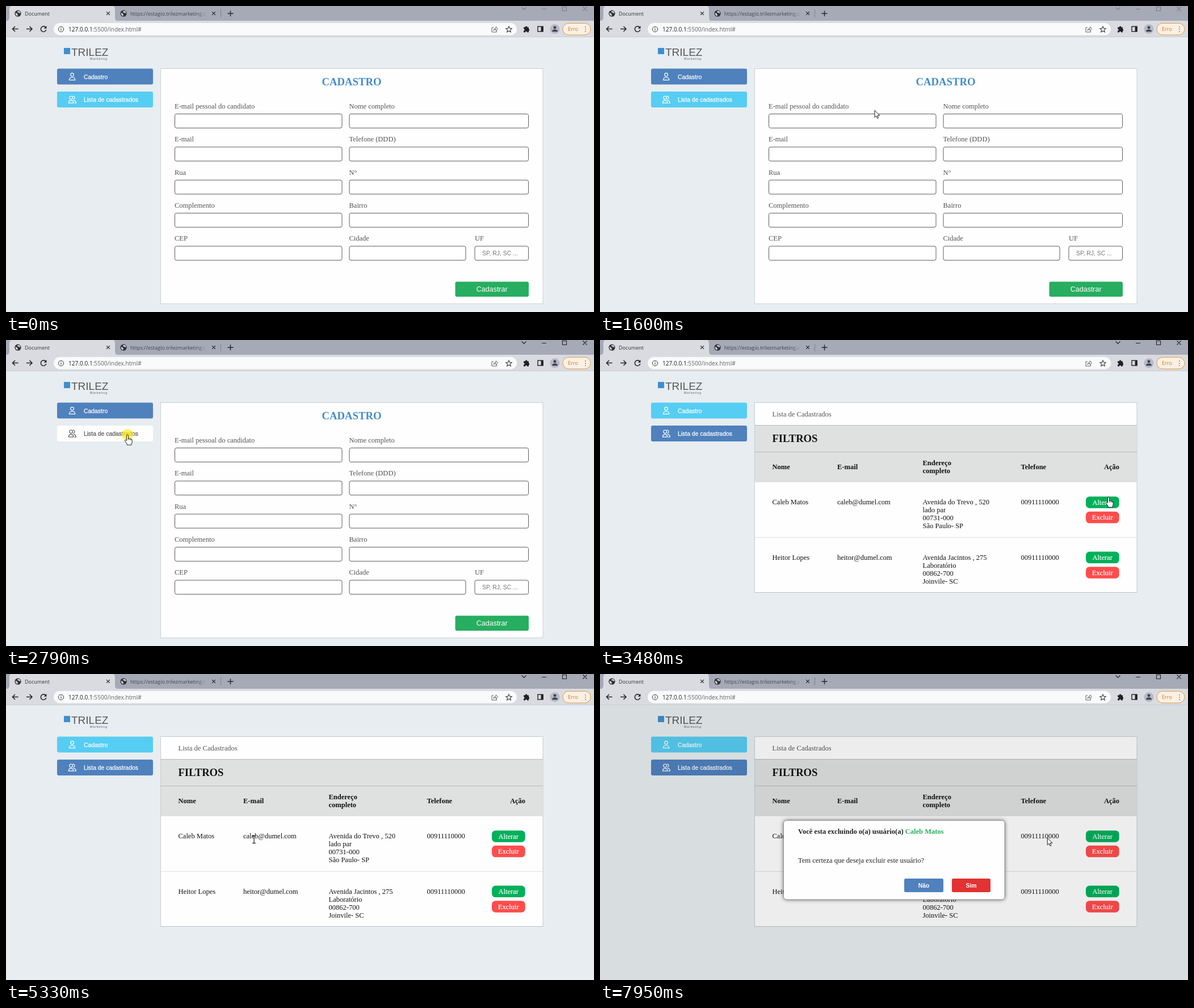
An HTML page that plays this animation: 1036x540 px, repeating every 8 s.

```html
<!DOCTYPE html>
<html lang="pt-BR">
<head>
<meta charset="utf-8">
<title>Cadastro</title>
<style>
html, body { margin: 0; width: 100%; height: 100%; overflow: hidden; background: #e7edf0; }
svg { display: block; width: 100%; height: 100%; }
text { white-space: pre; }
.serif { font: 12.5px "Liberation Serif", "Times New Roman", serif; }
.sans { font: 10.4px "Liberation Sans", Arial, sans-serif; }
.ui { font: 9px "Open Sans", "Noto Sans", sans-serif; }
.b { font-weight: bold; }
.side { stroke-width: .25; }
</style>
</head>
<body>
<svg id="stage" viewBox="0 0 1036 540"></svg>
<script>
const LOOP = 8000;
const BLUE = '#4f81bd', CYAN = '#56cdf2', GREEN = '#00b05a', RED = '#ff4c4c';
const PERSON = { name: 'Caleb Matos', mail: 'caleb@dumel.com', phone: '00911110000',
  address: ['Avenida do Trevo , 520', 'lado par', '00731-000', 'São Paulo- SP'] };
const OTHER = { name: 'Heitor Lopes', mail: 'heitor@dumel.com', phone: '00911110000',
  address: ['Avenida Jacintos , 275', 'Laboratório', '00862-700', 'Joinvile- SC'] };

const rect = (x, y, w, h, fill, more = '') =>
  `<rect x="${x}" y="${y}" width="${w}" height="${h}" fill="${fill}" ${more}/>`;
const text = (x, y, s, fill, cls = 'serif', more = '') =>
  `<text x="${x}" y="${y}" fill="${fill}" class="${cls}" ${more}>${s}</text>`;
const line = (d, color, w = 1, more = '') =>
  `<path d="${d}" fill="none" stroke="${color}" stroke-width="${w}" ${more}/>`;
const dot = (x, y, r, fill, more = '') => `<circle cx="${x}" cy="${y}" r="${r}" fill="${fill}" ${more}/>`;
const group = (id, body, more = '') => `<g id="${id}" ${more}>${body}</g>`;
const mid = 'text-anchor="middle"';

// Browser frame
const cross = (x, y, r, color, w) =>
  line(`M${x - r} ${y - r}L${x + r} ${y + r}M${x + r} ${y - r}L${x - r} ${y + r}`, color, w);
const globe = x => dot(x, 13.2, 5.6, '#2f3136') +
  `<path d="M${x - 4.4} 12.3q2.4-.1 3 1.2t1.4 1.6l-.9 2.7q-3-.9-3.5-5.5zM${x - .8} 9.2l3.2-.3q2 1.4 2.1 3.4l-2.2.5-1-1.4-2.4-.5z" fill="#d6d8de"/>`;

function browser() {
  const ink = '#3c4043';
  return rect(0, 0, 1036, 27, '#a6a9b6') +
    '<path d="M0 27Q6 26 6 20V6Q6-1 13-1H185Q192-1 192 6V20Q192 26 198 27Z" fill="#d9dbe0"/>' +
    rect(0, 26, 1036, 29, '#d9dbe0') + rect(0, 54, 1036, 1, '#c9ccd1') +
    globe(21) + text(33, 16.5, 'Document', '#303237', 'ui') + cross(180, 13, 2.9, '#25272b', 1.2) +
    globe(207) + text(219, 16.5, 'https://estagio.trilezmarketing.c', 'url(#fade)', 'ui') +
    cross(366, 13, 2.9, '#25272b', 1.2) + line('M378.5 6V20', '#7f828d') +
    line('M390.5 13.2H400.5M395.5 8.2V18.2', '#25272b', 1.4) +
    group('controls', line('M908.5 2.5L912.5 6.5L916.5 2.5M944 5.5H952M980.5 1.5H987.5V8.5H980.5ZM1016.5 1.5L1023.5 8.5M1023.5 1.5L1016.5 8.5', 'currentColor', 1.1)) +
    rect(84, 30, 816, 21.5, '#f9fafb', 'rx="10.7"') +
    line('M21.5 40.5H11.5M16 36L11.5 40.5L16 45M36 40.5H46M41.5 36L46 40.5L41.5 45', '#25272b', 1.6) +
    line('M70.3 38.2A4.8 4.8 0 1 0 70.8 42', '#25272b', 1.6) + '<path d="M71.5 35V39.8H66.7Z" fill="#25272b"/>' +
    dot(97, 41, 4.7, 'none', `stroke="${ink}"`) + line('M97 40.3V43.6M97 38V39.2', ink, 1.1) +
    `<text x="110" y="44.5" class="ui" style="font-size:10.1px" fill="#202124">127.0.0.1<tspan fill="#5f6368">:5500/index.html#</tspan></text>` +
    line('M859 38H856V46H864.5V43.5M858.8 43.2Q859.5 39.5 863.2 39.3V36.8L866.8 40.3L863.2 43.6V41.3Q860.5 41.4 858.8 43.2Z', '#5f6368', 1) +
    line('M886 35.9L887.5 39.4L891.3 39.8L888.4 42.2L889.3 46L886 44L882.7 46L883.6 42.2L880.7 39.8L884.5 39.4Z', ink, 1.1) +
    '<path d="M912 37.5H914.7A1.9 1.9 0 0 1 918.5 37.5H921V40.4A1.9 1.9 0 0 1 921 44V46.5H918.2A1.7 1.7 0 0 0 914.8 46.5H912V43.7A1.7 1.7 0 0 0 912 40.3Z" fill="#202124"/>' +
    rect(937, 36.2, 9, 8.8, 'none', 'stroke="#202124" stroke-width="1.4"') + rect(942.6, 36, 4, 9, '#202124') +
    dot(967, 40.8, 8.5, '#b4b8c8') + dot(967, 38, 2.4, ink) + '<path d="M962 45.2Q962 41.6 967 41.6T972 45.2Z" fill="#3c4043"/>' +
    rect(981, 30.5, 49, 20.5, '#faf0e4', 'rx="10.2" stroke="#e59a45"') +
    text(990, 44.2, 'Erro', '#d9760b', 'ui', 'style="font-size:9.2px"') +
    [37, 41, 45].map(y => dot(1021, y, 1, '#d9760b')).join('');
}

// Page parts
const head = (x, y) => `<circle cx="${x}" cy="${y}" r="2.8"/>`;
const icons = [
  head(116.6, 121.2) + '<path d="M111.5 130.6Q111.5 126 116.6 126T121.7 130.6Z"/>',
  head(114.6, 161.8) + '<path d="M110.4 171.1Q110.4 166.6 114.6 166.6T118.8 171.1ZM117.6 159.2A2.7 2.7 0 1 1 118.2 164.5M119 166.4Q123.3 167 123.3 171.1H120.4"/>'
];
const sideButton = (i, y, label) => group('side' + i,
  rect(90, y, 169, 28, BLUE, 'rx="3"') +
  `<g fill="none" stroke="currentColor" stroke-width="1.2">${icons[i]}</g>` +
  text(137, y + 18, label, 'currentColor', 'sans side', 'stroke="currentColor"'));

const row = k => 58.35 * k;
const input = (x, k, w) => rect(x + .5, 190.5 + row(k), w, 24.8, '#fff', 'rx="3" stroke="#5c5c5c"');

function form() {
  const labels = [['E-mail pessoal do candidato', 'Nome completo'], ['E-mail', 'Telefone (DDD)'],
    ['Rua', 'N°'], ['Complemento', 'Bairro'], ['CEP', 'Cidade']];
  return rect(272.5, 110.5, 673.5, 415, '#fefefe', 'stroke="#cbd0d3"') +
    text(609, 140, 'CADASTRO', '#428bca', 'serif b', mid + ' style="font-size:18.7px"') +
    labels.map(([a, b], k) =>
      text(297, 181 + row(k), a, '#545454') + text(604.5, 181 + row(k), b, '#545454') +
      input(297, k, 294.5) + input(604.5, k, k < 4 ? 315.5 : 205)).join('') +
    text(826, 181 + row(4), 'UF', '#545454') + input(825.5, 4, 94.5) +
    text(839, 439.8, 'SP, RJ, SC ...', '#757575', 'sans') +
    rect(791.5, 486.5, 129.5, 26.5, '#27ae60', 'rx="3"') +
    text(856.2, 503.6, 'Cadastrar', '#fff', 'sans', mid + ' style="font-size:12.5px"');
}

const action = (id, y, label, fill) => group(id, rect(856, y, 58.7, 20.5, fill, 'rx="6.5"') +
  text(885.2, y + 14.3, label, '#fff', 'serif', mid + ' stroke="#fff" stroke-width=".2"'));
const record = (p, y, i) =>
  text(303.5, y, p.name, '#111') + text(418, y, p.mail, '#111') +
  p.address.map((s, k) => text(568.5, y + 14 * k, s, '#111')).join('') +
  text(741.5, y, p.phone, '#111') +
  action('edit' + i, y - 14.2, 'Alterar', GREEN) + action('drop' + i, y + 12.4, 'Excluir', RED);

function list() {
  const th = (x, y, s) => text(x, y, s, '#111', 'serif b');
  return rect(272.5, 110.5, 673.5, 335, '#fefefe', 'stroke="#c9cdcf"') +
    text(303.5, 135, 'Lista de Cadastrados', '#555') +
    rect(273, 150.5, 673, 100.5, '#dfe0e0') +
    line('M272 150.5H946M272 197.5H946', '#b9bbbb') +
    text(303.5, 180, 'FILTROS', '#111', 'serif b', 'style="font-size:18.6px"') +
    th(303.5, 228.3, 'Nome') + th(418, 228.3, 'E-mail') + th(568.5, 221.3, 'Endereço') +
    th(568.5, 235.3, 'completo') + th(741.5, 228.3, 'Telefone') + th(888, 228.3, 'Ação') +
    record(PERSON, 290.4, 0) + line('M273 348.5H946', '#dcdede') + record(OTHER, 387.8, 1) +
    line('M272 445.5H946', '#bfc3c5');
}

function dialog() {
  const button = (x, w, label, fill) => rect(x, 361, w, 24, fill, 'rx="2.5"') +
    text(x + w / 2, 376.8, label, '#fff', 'sans b', mid);
  return rect(0, 55, 1036, 485, '#000', 'opacity=".065"') +
    rect(323.5, 258.5, 389.5, 139.5, '#555', 'rx="5" filter="url(#blur)"') +
    rect(323.5, 258.5, 389.5, 139.5, '#fefefe', 'rx="5" stroke="#8a8a8a" stroke-width=".8"') +
    `<text x="349" y="282" class="serif b" fill="#222">Você esta excluindo o(a) usuário(a) <tspan fill="#27ae60">${PERSON.name}</tspan></text>` +
    text(349, 333, 'Tem certeza que deseja excluir este usuário?', '#222') +
    button(536, 69, 'Não', BLUE) + button(620, 68, 'Sim', '#e23232');
}

const outline = 'fill="#fff" stroke="#111" stroke-width=".95" stroke-linejoin="round"';
const pointer = group('click', dot(0, 0, 9.8, '#ffee10', 'opacity=".72"')) +
  group('arrow', `<path d="M.3.4V12.7L3.1 10L5 14.4L7 13.5L5.1 9.3H9Z" ${outline}/>`) +
  group('hand', `<path d="M-1.5 10.5V1.7A1.45 1.45 0 0 1 1.4 1.7V6.6Q3.9 5.9 4.1 7.2Q6.2 6.7 6.4 8.2Q8.2 8 8.2 9.8V13Q8 15 7 16.6V18.2H-.6V16.8Q-2 14.5 -4.3 11.6Q-5 9.5 -3.6 9.2Q-2.6 9.3 -1.5 10.8Z" ${outline}/>` +
    line('M1.4 6.6V9.6M4.1 7.2V9.8M6.4 8.2V10', '#111', .85)) +
  group('beam', line('M-3-6.5H-.8L0-5.8L.8-6.5H3M0-5.8V5.8M-3 6.5H-.8L0 5.8L.8 6.5H3', '#111', 1.1));

const stage = document.getElementById('stage');
stage.innerHTML =
  `<defs><filter id="blur" x="-10%" y="-20%" width="120%" height="140%"><feGaussianBlur stdDeviation="3.5"/></filter>
  <linearGradient id="fade" gradientUnits="userSpaceOnUse" x1="335" x2="356" y1="0" y2="0">
  <stop stop-color="#43464e"/><stop offset="1" stop-color="#43464e" stop-opacity="0"/></linearGradient></defs>` +
  rect(0, 0, 1036, 540, '#e7edf0') + browser() +
  rect(102, 74, 11, 11, '#3f8fd0') +
  text(115, 88, 'TRILEZ', '#58595b', 'sans', 'style="font-size:19px"') +
  text(148, 94.5, 'Marketing', '#58595b', 'sans', 'style="font-size:5.2px" letter-spacing=".9"') +
  sideButton(0, 110.5, 'Cadastro') + sideButton(1, 151, 'Lista de cadastrados') +
  group('form', form()) + group('list', list()) + group('dialog', dialog()) + group('pointer', pointer);

const el = id => document.getElementById(id);
const show = (id, on) => { el(id).style.display = on ? '' : 'none'; };
const boxes = selector => [...stage.querySelectorAll(selector)].map(n => n.getBBox());
const inside = (b, [x, y]) => x >= b.x && x <= b.x + b.width && y >= b.y && y <= b.y + b.height;

// Hit areas, measured while everything is shown
const sideIds = ['side0', 'side1'], actionIds = ['edit0', 'drop0', 'edit1', 'drop1'];
const area = Object.fromEntries([...sideIds, ...actionIds].map(id => [id, el(id).querySelector('rect').getBBox()]));
const textAreas = { form: boxes('#form text, #form rect[stroke="#5c5c5c"]'), list: boxes('#list text') };
const submitArea = { x: 791.5, y: 486.5, width: 129.5, height: 26.5 };

// Bursts of movement: start, end, number of steps
const bursts = [[300, 1070, 13], [1140, 1900, 13], [1970, 2020, 2], [2160, 2470, 6], [2670, 3430, 12],
  [3480, 3610, 3], [3930, 4300, 6], [4500, 5250, 13], [5330, 6070, 13], [6140, 6280, 3],
  [6460, 6460, 1], [6940, 7010, 2], [7260, 7950, 11]];
// Pointer path: time, x, y
const path = [[300, 1010, 529], [640, 900, 450], [1070, 733, 401], [1583, 484, 184], [1900, 225, 121],
  [2020, 213, 119], [2100, 213, 119], [2470, 214, 167], [2750, 214, 167], [3430, 898, 264],
  [3480, 896, 277], [3610, 893, 283], [3870, 893, 283], [4300, 889, 309], [4440, 889, 310],
  [5187, 415, 296], [5250, 417, 298], [5330, 437, 292], [5800, 740, 325], [6070, 886, 316],
  [6280, 886, 312], [6460, 886, 311], [7190, 886, 311], [7950, 788, 289]];

function snap(t) {
  const b = bursts.filter(b => b[0] <= t).pop();
  if (!b) return t;
  const [from, to, n] = b;
  if (t >= to) return to;
  const step = (to - from) / (n - 1);
  return from + Math.floor((t - from) / step + 1e-6) * step;
}

function position(t) {
  const i = path.findIndex(p => p[0] > t);
  if (i < 0) return path[path.length - 1].slice(1);
  if (i === 0) return path[0].slice(1);
  const [a, b] = [path[i - 1], path[i]], k = (t - a[0]) / (b[0] - a[0]);
  return [a[1] + (b[1] - a[1]) * k, a[2] + (b[2] - a[2]) * k];
}

const targetAt = (p, onList) => [...sideIds, ...(onList ? actionIds : [])].find(id => inside(area[id], p));

function render(time) {
  const t = snap(time), onList = t >= 2800, asking = t >= 7260;
  const p = position(t);
  const hover = asking ? null : targetAt(position(snap(time - 60)), onList);

  show('form', !onList);
  show('list', onList);
  show('dialog', asking);
  el('dialog').style.opacity = Math.min(1, Math.max(0, (t - 7190) / 200));
  el('controls').style.color = t < 2670 ? '#7b7e89' : '#202124';

  sideIds.forEach((id, i) => {
    const lit = hover === id, active = i === +onList;
    el(id).style.color = lit ? '#5c5c5c' : '#fff';
    el(id).firstChild.setAttribute('fill', lit ? '#fefefe' : active ? BLUE : CYAN);
  });
  actionIds.forEach(id => {
    const edit = id.startsWith('edit'), lit = hover === id;
    el(id).firstChild.setAttribute('fill', edit ? (lit ? '#00a04e' : GREEN) : (lit ? '#ff0000' : RED));
  });

  let kind = 'arrow';
  if (!asking) {
    if (targetAt(p, onList) || (!onList && inside(submitArea, p))) kind = 'hand';
    else if (textAreas[onList ? 'list' : 'form'].some(b => inside(b, p))) kind = 'beam';
  }
  ['arrow', 'hand', 'beam'].forEach(k => show(k, k === kind));
  show('click', (t >= 2670 && t < 2800) || (t >= 6940 && t < 7010));
  show('pointer', t >= 300);
  el('pointer').setAttribute('transform', `translate(${p[0].toFixed(1)} ${p[1].toFixed(1)})`);
}

const start = performance.now();
function tick() {
  render((performance.now() - start) % LOOP);
  requestAnimationFrame(tick);
}
tick();
</script>
</body>
</html>
```
